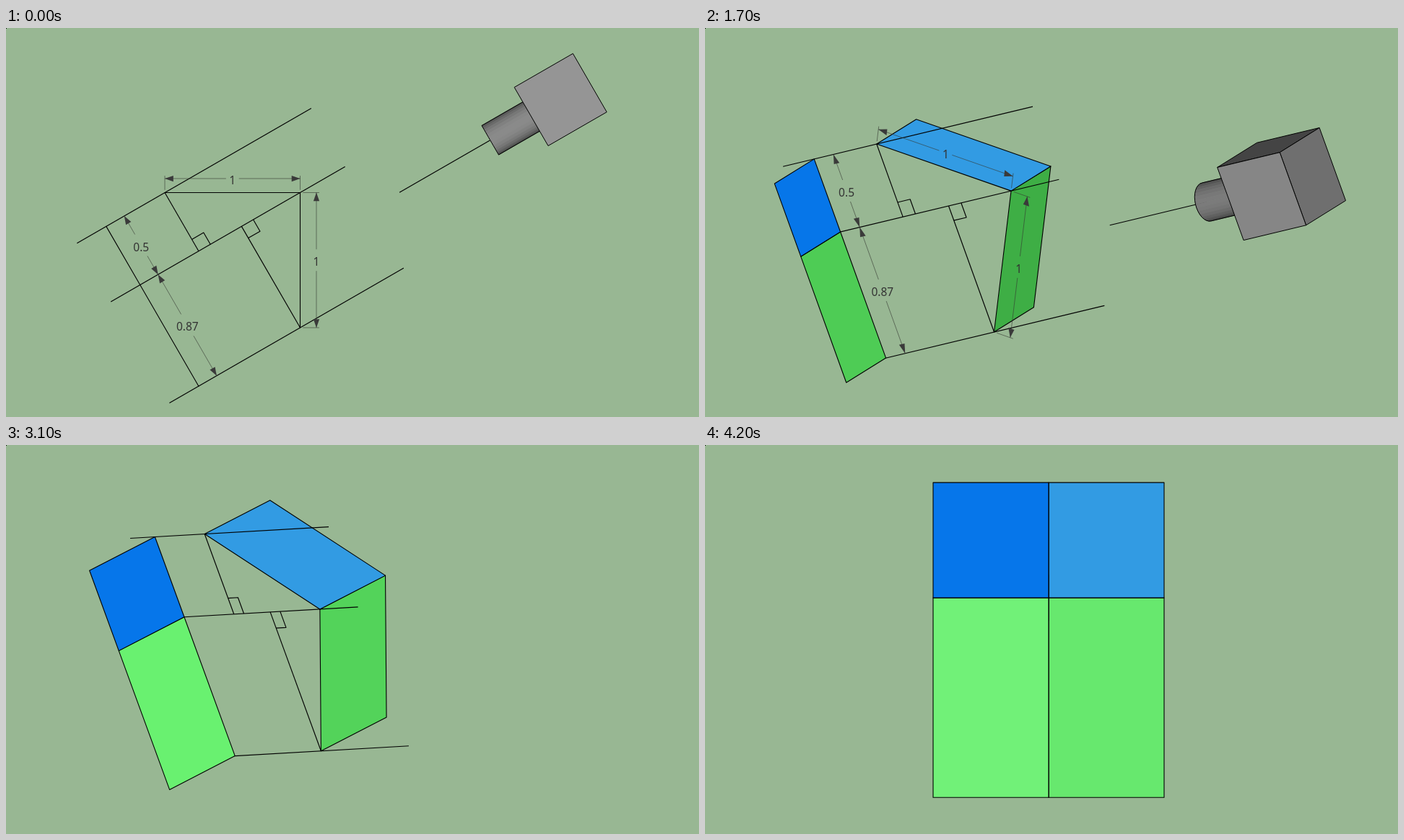
Recreate the animation shown at these times as an HTML page with a canvas. Size 960 px wide and 540 px high, loop 5.2 s.

```html
<!DOCTYPE html>
<html lang="en">
<head>
<meta charset="utf-8">
<title>Projected areas</title>
<style>
html, body { margin: 0; width: 100%; height: 100%; overflow: hidden; background: #98b793; }
canvas { display: block; }
</style>
</head>
<body>
<canvas id="stage" width="960" height="540"></canvas>
<script>
const ctx = document.getElementById('stage').getContext('2d');
const LOOP = 5200, STEP = 100, STEPS = 12;
const C30 = Math.sqrt(3) / 2, R2 = Math.SQRT1_2, R3 = 1 / Math.sqrt(3), R6 = 1 / Math.sqrt(6);

// Parallel cameras: direction to the viewer, up, view centre, pixels per unit.
// World axes: x right, y down, z away; the shared corner of the sheets is the origin.
const VIEWS = [
  { dir: [0, 0, -1], up: [0, -1, 0], at: [.3867, .2213, .125], scale: 187.5 },
  { dir: [R3, -R3, -R3], up: [-R6, -2 * R6, R6], at: [.2096, .1382, .0716], scale: 236.4 },
  { dir: [C30, -.5, 0], up: [-.5, -C30, 0], at: [.1598, .1167, .0125], scale: 320 }
];

const dot = (a, b) => a[0] * b[0] + a[1] * b[1] + a[2] * b[2];
const mix = (a, b, p, q) => a.map((v, i) => v * p + b[i] * q);
const unit = a => a.map(v => v / Math.hypot(...a));
const cross = (a, b) => [a[1] * b[2] - a[2] * b[1], a[2] * b[0] - a[0] * b[2], a[0] * b[1] - a[1] * b[0]];
function slerp(a, b, t) {
  const w = Math.acos(dot(a, b)), s = Math.sin(w);
  return mix(a, b, Math.sin((1 - t) * w) / s, Math.sin(t * w) / s);
}

let cam;
function aim(a, b, t) {
  const dir = unit(slerp(a.dir, b.dir, t));
  const rawUp = slerp(a.up, b.up, t);
  const down = unit(mix(rawUp, dir, -1, dot(rawUp, dir)));
  const right = cross(down, dir.map(v => -v));
  cam = { dir, down, right, at: mix(a.at, b.at, 1 - t, t), scale: 1 / ((1 - t) / a.scale + t / b.scale) };
}
function project(p) {
  const r = mix(p, cam.at, 1, -1);
  return [480 + cam.scale * dot(r, cam.right), 270 + cam.scale * dot(r, cam.down)];
}
// u runs along the sight lines, v across them.
const world = (u, v, z = 0) => [C30 * u + .5 * v, -.5 * u + C30 * v, z];

function path(points, close) {
  ctx.beginPath();
  points.forEach(p => ctx.lineTo(...project(p)));
  if (close) ctx.closePath();
}
function line(points, width = 1.15, color = '#000') {
  path(points);
  ctx.lineWidth = width;
  ctx.strokeStyle = color;
  ctx.stroke();
}
function face(points, fill, width = 1.1) {
  path(points, true);
  ctx.fillStyle = fill;
  ctx.fill();
  ctx.lineWidth = width;
  ctx.strokeStyle = '#000';
  ctx.stroke();
}

const rgb = c => `rgb(${c.map(Math.round)})`;
const grey = d => rgb(Array(3).fill(Math.min(149, 52 + 102 * d)));
function green(d, cap) {
  const g = Math.min(cap, 93 + 193 * d), r = g * (.27 + .2 * d);
  return rgb([r, g, r + 7]);
}
const blue = (d, base, gain) => rgb(base.map(c => c * Math.min(1, gain * (.385 + .8 * d))));

const A = [-1, 0, 0], P = [0, 0, 0], C = [0, 1, 0], U = world(1, 0), V = world(0, 1);
const WALL = -.5 - C30;

function sheets() {
  const back = p => [p[0], p[1], .5];
  face([P, C, back(C), back(P)], green(cam.dir[0], 232));
  face([A, P, back(P), back(A)], blue(-cam.dir[1], [50, 155, 227], 1.75));
}
function wall() {
  const lit = dot(cam.dir, U);
  const panel = (v0, v1, fill) =>
    face([world(WALL, v0), world(WALL, v1), world(WALL, v1, -.5), world(WALL, v0, -.5)], fill);
  panel(0, C30, green(lit, 241));
  panel(-.5, 0, blue(lit, [6, 118, 234], 1.18));
}
function sightLines() {
  for (const v of [-.5, 0, C30]) line([world(-1.615, v), world(.383, v)]);
  for (const [u, v, side] of [[-C30, -.5, -.1], [-.5, C30, .1]]) {
    line([world(u, v), world(u, 0)]);
    line([world(u, side), world(u + .1, side), world(u + .1, 0)]);
  }
}

// Dimension from a to b; ext is the direction of the extension lines, if any.
function dimension(a, b, label, off = 0, ext) {
  const ink = 'rgba(52,56,50,.75)', dark = '#3a3a3a';
  const shift = p => ext ? mix(p, ext, 1, off) : p;
  if (ext) for (const p of [a, b]) line([mix(p, ext, 1, .02), mix(p, ext, 1, off + .021)], .8, ink);
  const from = shift(a), to = shift(b);
  const [x0, y0] = project(from), [x1, y1] = project(to);
  ctx.font = '15.5px "Noto Sans", "Open Sans", sans-serif';
  const w = ctx.measureText(label).width;
  const gap = Math.min((w / 2 + 4.5) / Math.abs(x1 - x0), 15 / Math.abs(y1 - y0), .5);
  line([from, mix(from, to, .5 + gap, .5 - gap)], .8, ink);
  line([mix(from, to, .5 - gap, .5 + gap), to], .8, ink);

  const along = unit(mix(to, from, 1, -1)), side = [-along[1], along[0], 0];
  for (const [tip, s] of [[from, .063], [to, -.063]]) {
    const base = mix(tip, along, 1, s);
    path([tip, mix(base, side, 1, .022), mix(base, side, 1, -.022)], true);
    ctx.fillStyle = dark;
    ctx.fill();
  }
  ctx.textAlign = 'center';
  ctx.fillStyle = '#333';
  ctx.fillText(label, (x0 + x1) / 2, (y0 + y1) / 2 + 8);
}
function dimensions() {
  dimension(A, P, '1', .104, [0, -1, 0]);
  dimension(P, C, '1', .12, [1, 0, 0]);
  dimension(world(-1.212, -.5), world(-1.212, 0), '0.5');
  dimension(world(-1.212, 0), world(-1.212, C30), '0.87');
}

function viewer() {
  const mid = .366, r = .125, lens = 1.41, near = 1.76, far = 2.26, h = .25, N = 32;
  line([world(.636, mid), world(lens, mid)]);

  const rim = (u, i) => {
    const f = i * 2 * Math.PI / N;
    return world(u, mid + r * Math.cos(f), r * Math.sin(f));
  };
  for (let i = 0; i < N; i++) {
    const f = (i + .5) * 2 * Math.PI / N;
    const lit = dot(cam.dir, world(0, Math.cos(f), Math.sin(f)));
    if (lit <= 0) continue;
    const fill = grey(lit * .85);
    path([rim(lens, i), rim(lens, i + 1), rim(near, i + 1), rim(near, i)], true);
    ctx.fillStyle = ctx.strokeStyle = fill;
    ctx.lineWidth = .6;
    ctx.fill();
    ctx.stroke();
  }
  for (let i = 0; i < N; i++) {
    const lit = k => {
      const f = (k + .5) * 2 * Math.PI / N;
      return dot(cam.dir, world(0, Math.cos(f), Math.sin(f))) > 0;
    };
    if (lit(i)) line([rim(lens, i), rim(lens, i + 1)], 1);
    if (lit(i) !== lit(i - 1)) line([rim(lens, i), rim(near, i)], 1);
  }

  const v0 = mid - h, v1 = mid + h;
  const sides = [
    [V.map(c => -c), [near, v0, -h], [far, v0, -h], [far, v0, h], [near, v0, h]],
    [U, [far, v0, -h], [far, v1, -h], [far, v1, h], [far, v0, h]],
    [[0, 0, -1], [near, v0, -h], [far, v0, -h], [far, v1, -h], [near, v1, -h]]
  ];
  for (const [normal, ...corners] of sides) {
    const lit = dot(normal, cam.dir);
    if (lit > .001) face(corners.map(c => world(...c)), grey(lit), 1);
  }
}

function draw(ms) {
  const stepsSince = start => Math.max(0, Math.min(STEPS, Math.floor((ms - start) / STEP) + 1));
  const first = stepsSince(1000), second = stepsSince(3100);
  if (second) aim(VIEWS[1], VIEWS[2], second / STEPS);
  else aim(VIEWS[0], VIEWS[1], first / STEPS);

  ctx.fillStyle = '#98b793';
  ctx.fillRect(0, 0, 960, 540);
  ctx.fillStyle = '#000';
  ctx.fillRect(0, 0, 1, 1);
  ctx.lineJoin = 'round';
  sheets();
  sightLines();
  if (!second) dimensions();
  wall();
  if (!second) viewer();
}

const t0 = performance.now();
function tick() {
  draw((performance.now() - t0) % LOOP);
  requestAnimationFrame(tick);
}
tick();
</script>
</body>
</html>
```
